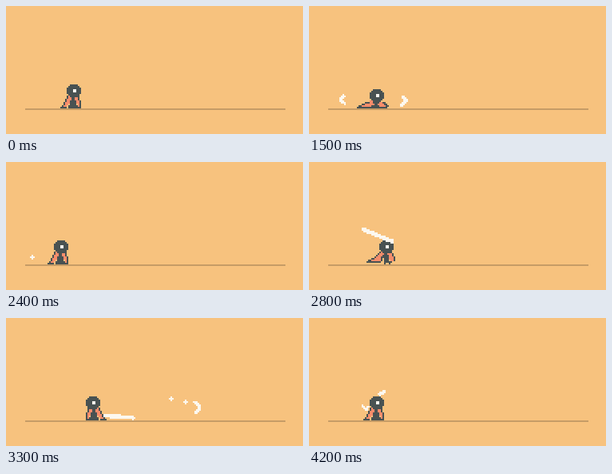
An HTML page with a canvas that plays this animation: 372 px wide and 160 px high, repeating every 4.3 s.

```html
<!DOCTYPE html>
<html lang="en">
<head>
<meta charset="utf-8">
<title>Pixel hero</title>
<style>
  html, body { margin: 0; width: 100%; height: 100%; overflow: hidden; background: #f7c27e; }
  canvas { display: block; width: 372px; height: 160px; image-rendering: pixelated; }
</style>
</head>
<body>
<canvas id="stage" width="372" height="160"></canvas>
<script>
const ctx = document.getElementById('stage').getContext('2d');
const CELL = 2, STEP = 100, STEPS = 43;
const INK = { '#': '#495252', o: '#f78c6b', w: '#fcf8f0' };

const HEAD = ['..#####..', '.#######.', '#########', '####ww###', '####ww###',
              '#########', '.#######.', '..#####..'];

// dx, dy: body offset from the head; y: resting head height
const BODIES = {
  idle: { dx: -4, dy: 7, y: 49, rows: [
    '....#oo##oo#.',
    '....#oo##oo#.',
    '...#ooo##oo#.',
    '...#oo####oo#',
    '..#ooo####oo#',
    '..#oo.####.o#',
    '.#oo.######o#',
    '####.########'] },
  tall: { dx: -2, dy: 8, y: 44, rows: [
    '...#o##oo#.',
    '..#oo##oo#.',
    '.#ooo##o#o#',
    '.#oo.##.oo#',
    '.#oo###.oo#',
    '#ooo###.oo#',
    '#ooo####oo#',
    '#oo.####.##',
    '#oo.##.#...',
    '##.........'] },
  squash: { dx: -8, dy: 7, y: 52, rows: [
    '........oo####......',
    '.....###oo####oo##..',
    '...##oooooo##oooo##.',
    '.##oooooo#####oooo##',
    '###################.'] },
  lean: { dx: -6, dy: 6, y: 50, rows: [
    '......#oo####...',
    '.....#oooo##o#..',
    '...##ooooo##o#..',
    '..#oooooo####o#.',
    '.#oooooo#####o#.',
    '#ooooo.########.',
    '#ooo##.########.',
    '################'] },
  guard: { dx: -8, dy: 7, y: 49, rows: [
    '........#oo##oo#..',
    '.......#ooo##ooo#.',
    '......#ooo####oo#.',
    '.....#ooo#####ooo#',
    '...##oooo#.###ooo#',
    '.##oooooo#.###.oo#',
    '#########..#####..',
    '...........#..#...'] }
};

const FX = {
  puff: ['.ww..', '.www.', '..www', '..www', '.www.', 'www..', 'ww...'],
  wisp: ['..w.', '.www', 'www.', 'ww..', 'www.', '.www', '...w'],
  wave: ['www..', '.www.', '..www', '...ww', '...ww', '..www', '.www.', '.ww..'],
  dot: ['.w.', 'www', '.w.'],
  speck: ['w'],
  hilt: ['...ww', '.wwww', 'wwww.', '.w...'],
  tip: ['w....', 'ww.ww', '.www.', '..ww.']
};

// [first step, body, head x, head y, mirrored]
const POSES = [
  [0, 'idle', 38], [5, 'idle', 38, 50], [6, 'squash', 38],
  [8, 'tall', 38, 46], [9, 'tall', 38], [11, 'tall', 38, 45],
  [12, 'tall', 38, 46], [13, 'squash', 38],
  [16, 'lean', 75], [17, 'lean', 83], [18, 'lean', 86], [20, 'idle', 86],
  [21, 'lean', 58, 50, true], [22, 'lean', 28, 50, true], [24, 'idle', 30],
  [25, 'guard', 35], [26, 'guard', 40], [27, 'guard', 43], [28, 'guard', 44],
  [30, 'lean', 48], [31, 'idle', 50, 49, true],
  [36, 'guard', 48], [39, 'lean', 48], [40, 'idle', 50, 49, true],
  [41, 'idle', 42], [42, 'idle', 38]
];

function dot(x, y, ink) {
  ctx.fillStyle = INK[ink];
  ctx.fillRect(x * CELL, y * CELL, CELL, CELL);
}

function sprite(rows, x, y, mirror) {
  const w = rows[0].length;
  rows.forEach((row, j) => [...row].forEach((c, i) => {
    if (INK[c]) dot(x + (mirror ? w - 1 - i : i), y + j, c);
  }));
}

const fx = (name, x, y, mirror) => sprite(FX[name], x, y, mirror);

// Fill every white cell that passes the test
function fillCells(test) {
  for (let y = 36; y < 64; y++)
    for (let x = 14; x < 123; x++)
      if (test(x + .5, y + .5)) dot(x, y, 'w');
}

function blade(x0, y0, x1, y1, r = 1.25) {
  const dx = x1 - x0, dy = y1 - y0, len = dx * dx + dy * dy;
  fillCells((x, y) => {
    const t = Math.max(0, Math.min(1, ((x - x0) * dx + (y - y0) * dy) / len));
    return Math.hypot(x - x0 - t * dx, y - y0 - t * dy) < r;
  });
}

// Swing trail, thickest at its leading end
function swing(cx, cy, r, from, to) {
  fillCells((x, y) => {
    const a = Math.atan2(y - cy, x - cx), d = Math.hypot(x - cx, y - cy);
    return a > from && a < to && d < r && d > r - 1 - 4 * (a - from) / (to - from);
  });
}

const lowBlade = () => blade(62, 61, 79.5, 62.3);

const EFFECTS = {
  13() { fx('wisp', 26, 56); fx('puff', 51, 56); },
  14() { fx('wisp', 22, 55); fx('puff', 54, 56); },
  15() { fx('wisp', 19, 55); fx('puff', 57, 56); },
  16() { blade(50, 60, 66, 60, .9); },
  17() { blade(64, 60, 74, 60, .6); fx('puff', 98, 56); },
  18() { fx('dot', 100, 58); },
  19() { fx('speck', 103, 59); },
  21() { blade(75, 60, 88, 60, .9); },
  22() { blade(47, 60, 72, 60, .6); },
  23() { fx('wisp', 18, 56); },
  24() { fx('dot', 15, 58); },
  25() { fx('speck', 14, 59); },
  26() { blade(48, 54, 44, 46); },
  27() { blade(51, 52, 45, 40.2); },
  28() { blade(34.4, 42.3, 52, 49.6); },
  29() { blade(31.3, 45, 50, 50); },
  30() { swing(52, 56, 19, -2, .3); },
  31() { lowBlade(); fx('wave', 82, 52); },
  32() { lowBlade(); fx('wave', 101, 52); fx('dot', 95, 50); },
  33() { lowBlade(); fx('dot', 102, 49); fx('dot', 111, 51); fx('wave', 117, 52); },
  34() { lowBlade(); fx('speck', 104, 49); fx('speck', 113, 52); fx('dot', 119, 55); },
  35() { lowBlade(); },
  36() { blade(52, 55, 34, 50); },
  37() { blade(46, 56, 27, 51); },
  38() { blade(44, 57, 25.3, 54); },
  39() { swing(54, 60, 17, -1.8, .2); },
  40() { blade(62, 60, 77.5, 61.5); },
  41() { blade(37, 57, 52, 47, .9); },
  42() { fx('hilt', 43, 45); fx('tip', 33, 54); }
};

function hero(step) {
  const [, name, x, top, mirror] = POSES.filter(p => p[0] <= step).pop();
  const body = BODIES[name], y = top ?? body.y;
  const left = mirror ? x + 9 - body.dx - body.rows[0].length : x + body.dx;
  sprite(body.rows, left, y + body.dy, mirror);
  sprite(HEAD, x, y);
}

function draw(step) {
  ctx.fillStyle = '#f7c27e';
  ctx.fillRect(0, 0, 372, 160);
  ctx.fillStyle = '#c69c66';
  ctx.fillRect(24, 128, 326, 2);
  hero(step);
  EFFECTS[step]?.();
}

let shown = -1;
function tick() {
  const step = Math.floor(performance.now() / STEP) % STEPS;
  if (step !== shown) draw(shown = step);
  requestAnimationFrame(tick);
}
tick();
</script>
</body>
</html>
```
